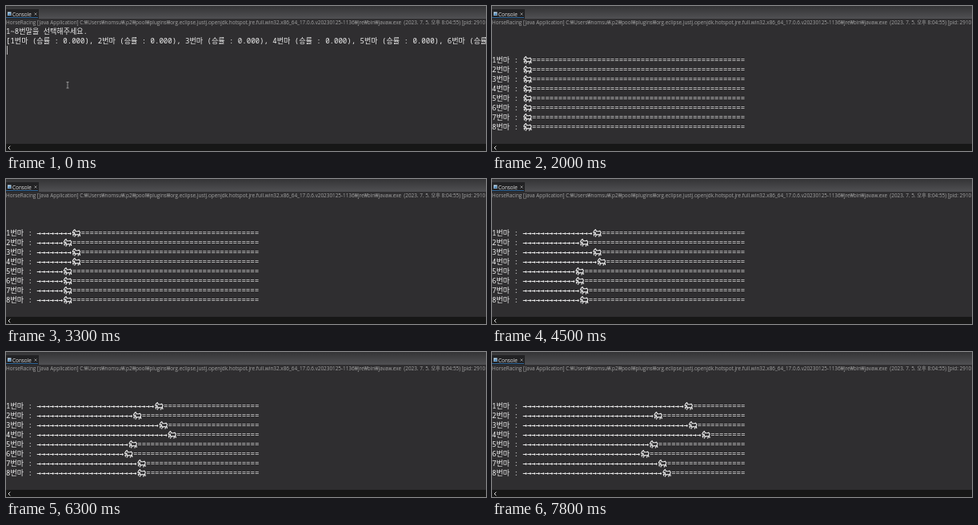
Animation of 600 by 182 pixels, one loop 8000 ms. Source, as an HTML page with a canvas:

```html
<!DOCTYPE html>
<html lang="ko">
<head>
<meta charset="utf-8">
<style>
html, body { margin: 0; width: 100%; height: 100%; overflow: hidden; background: #2f2e30 }
canvas { display: block }
</style>
</head>
<body>
<canvas id="stage" width="600" height="182"></canvas>
<script>
const ctx = document.getElementById('stage').getContext('2d');
const LOOP = 8000, CHAR = 5.44, TRACK = 49, TRACK_X = 38.5, HORSE_W = 11.6;
const MONO = '9.06px "Noto Sans Mono", "DejaVu Sans Mono", "Noto Sans CJK KR", "Noto Sans CJK", monospace';
const ARROWS = 'bold 9.04px "DejaVu Sans Mono", monospace';
const UI = '"Open Sans", "Noto Sans", "Noto Sans CJK KR", sans-serif';
const TITLE = 'HorseRacing [Java Application] C:\\Users\\nomsu\\.p2\\pool\\plugins\\org.eclipse.justj.openjdk.hotspot.jre.full.win32.x86_64_17.0.6.v20230125-1136\\jre\\bin\\javaw.exe  (2023. 7. 5. 오후 8:04:55) [pid: 2910'.replaceAll('\\', '₩');
const ODDS = '[' + [1, 2, 3, 4, 5, 6, 7, 8].map(n => n + '번마 (승률 : 0.000)').join(', ') + ']';

// Race turns and the distance of each horse at those turns
const TURNS = [0, 2, 5, 8, 10, 17, 23];
const RUNS = [
  [0, 3, 8, 13, 16, 27, 37],
  [0, 2, 6, 10, 13, 22, 30],
  [0, 3, 8, 13, 16, 28, 38],
  [0, 3, 8, 14, 17, 30, 41],
  [0, 2, 6, 9, 12, 21, 29],
  [0, 2, 6, 9, 12, 20, 27],
  [0, 2, 6, 10, 13, 23, 31],
  [0, 2, 6, 10, 13, 23, 32]
];
const HORSE = new Path2D('M.8 4 L2.4 1.4 L3.6 .6 L4.8 2.7 L7.6 2.8 L9 2.2 L10.3 3.8 L9.7 5.8 L10.3 9 M.8 4 L1.6 4.9 L3.2 4.1 L3.6 5.9 L1.4 6.7 L1.9 8.7 M3.6 5.9 L4.4 7.1 L3.4 9.6 M4.4 7.1 L7.2 6.6 L8.5 7.4 L7.7 9.6 M9.7 5.8 L8.5 7.4');

const strip = ctx.createLinearGradient(0, 0, 0, 16);
strip.addColorStop(0, '#343436');
strip.addColorStop(1, '#505053');

function box(color, x, y, w, h) {
  ctx.fillStyle = color;
  ctx.fillRect(x, y, w, h);
}

function text(str, x, y, font, color) {
  ctx.font = font;
  ctx.fillStyle = color;
  ctx.fillText(str, x, y);
}

function print(str, line, x = 0, color = '#eee', font = MONO) {
  text(str, x, 35 + 12 * line, font, color);
}

function line(path, color, width) {
  ctx.strokeStyle = color;
  ctx.lineWidth = width;
  ctx.stroke(new Path2D(path));
}

function distance(run, turn) {
  let i = 1;
  while (i < TURNS.length - 1 && TURNS[i] < turn) i++;
  const part = (turn - TURNS[i - 1]) / (TURNS[i] - TURNS[i - 1]);
  return Math.round(run[i - 1] + (run[i] - run[i - 1]) * part);
}

function drawFrame() {
  box('#2f2e30', 0, 0, 600, 182);
  box(strip, 0, 0, 600, 16);
  box('#222224', 0, 4, 41, 12);
  box('#2f6596', 0, 14, 40, 1);
  box('#b9d4e8', 2, 7.5, 4.5, 4.5);
  box('#3b78b0', 2.6, 9.4, 3.3, 2);
  text('Console', 8, 12.5, '6.4px ' + UI, '#e4e4e4');
  line('M35.5 8.5 l3 3 m0 -3 l-3 3', '#aaa', .7);
  text(TITLE, 0, 23.2, '6.38px ' + UI, '#a4a4a4');
  box('#171717', 0, 173, 600, 9);
  line('M5.3 175.7 l-2.3 2.3 l2.3 2.3', '#ddd', 1);
}

function drawIntro(t) {
  const started = t >= 800;
  print('1~8번말을 선택해주세요.', 0);
  print(ODDS, 1);
  if (t >= 300) print('3', 2, 0, '#7fa3bf');
  if (started) print('경기 시작', 4);
  box('#ddd', !started && t >= 300 ? 6 : 1, started ? 62 : 50, .8, 11);
}

function drawRace(t) {
  const turn = Math.max(0, Math.floor((t - 2000) / 250));
  RUNS.forEach((run, i) => {
    const steps = distance(run, turn), x = TRACK_X + steps * CHAR, row = i + 3;
    print(i + 1 + '번마 : ', row);
    print('→'.repeat(steps), row, TRACK_X, '#eee', ARROWS);
    print('='.repeat(TRACK - steps), row, x + HORSE_W, '#ddd');
    ctx.save();
    ctx.translate(x + .3, 27 + 12 * row);
    ctx.strokeStyle = '#f2f2f2';
    ctx.lineWidth = 1.1;
    ctx.stroke(HORSE);
    ctx.restore();
  });
}

function draw(now) {
  const t = Math.floor(now % LOOP / 100) * 100;
  drawFrame();
  if (t < 1700) drawIntro(t);
  else drawRace(t);
  if (t < 800 || (t >= 2300 && t < 2800))
    line('M75.5 95.5 h3 m-1.5 0 v7.5 m-1.5 0 h3', '#bbb', .7);
  requestAnimationFrame(draw);
}
draw(0);
</script>
</body>
</html>
```
